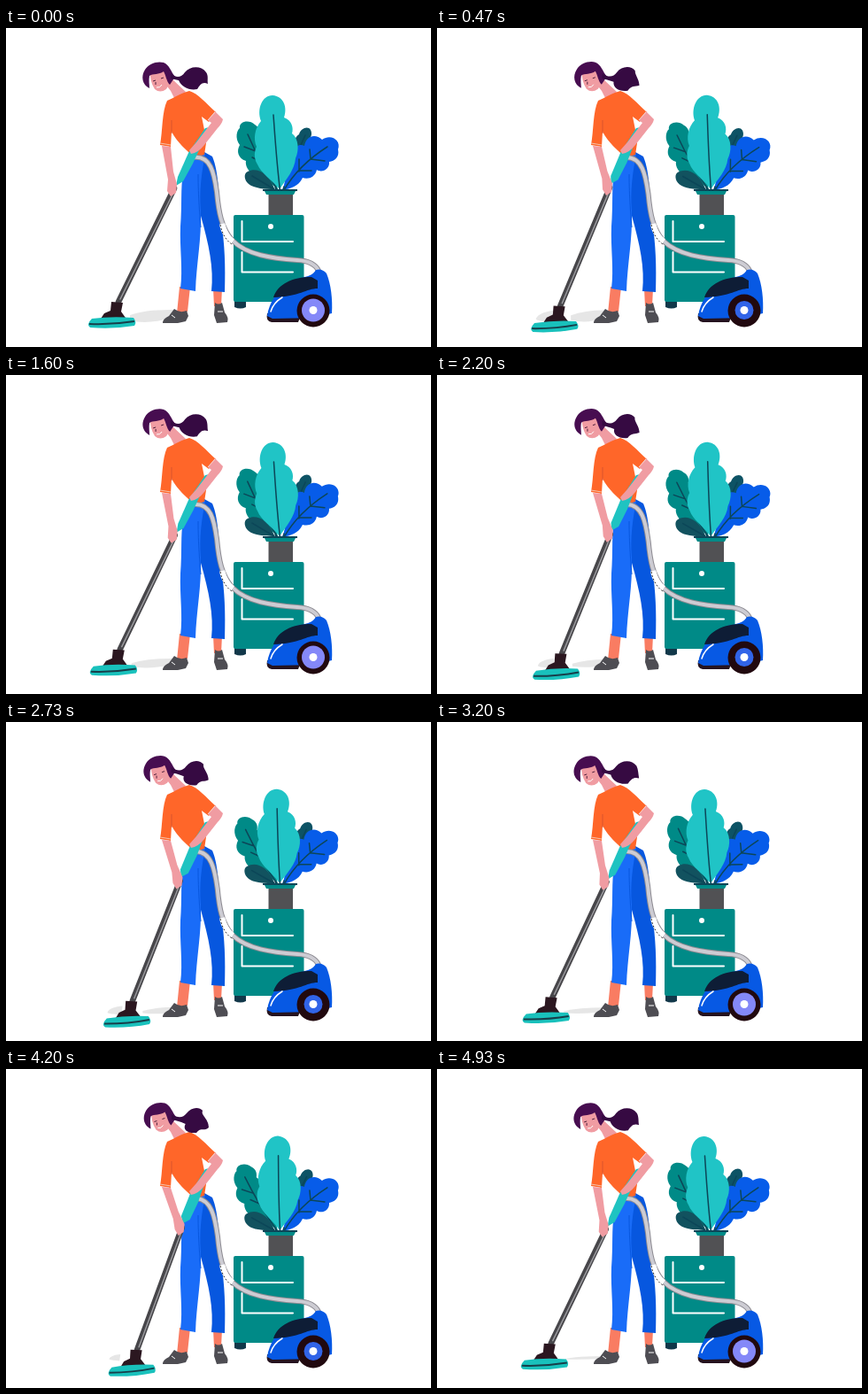
Write an HTML page that moves like this. It is 480 px wide and 360 px high and loops after 4990 ms.

```html
<!DOCTYPE html>
<html lang="en">
<head>
<meta charset="utf-8">
<title>Vacuuming</title>
<style>
html, body { margin: 0; width: 100%; height: 100%; overflow: hidden; background: #fff; }
svg { display: block; width: 100vw; height: 100vh; }
.line { fill: none; stroke-linecap: round; stroke-linejoin: round; }
.vein { fill: none; stroke: #0c4658; stroke-width: 1.5; stroke-linecap: round; }
.skin { fill: #f09ca2; }
.hair { fill: #470d50; }
.teal { fill: #008a87; }
.deep { fill: #0d5365; }
</style>
</head>
<body>
<svg viewBox="0 0 480 360">
  <g fill="#e6e6e6">
    <path id="shadowRight"/>
    <path id="shadowLeft" d="M111 329C113 322 124 319 136 318L134 333C125 331 116 332 111 329Z"/>
  </g>

  <g id="leafDark">
    <path class="deep" d="M314 180C317 164 322 151 326 140C324 130 326 123 331 120C333 113 341 110 344 115C346 119 345 123 342 126C347 132 342 139 335 142Z"/>
    <path class="vein" d="M338 121L322 156"/>
  </g>
  <g id="leafLeft">
    <path class="teal" d="M307 183C300 174 291 170 282 167C273 162 270 155 271 150C262 147 260 139 264 132C258 124 261 115 264 113C263 105 275 103 281 109C286 112 287 116 286 121C295 127 299 144 303 158Z"/>
    <path class="vein" d="M273 120C282 141 295 165 308 185M269 134L282 139M278 146L288 151"/>
  </g>
  <g id="leafLow">
    <path fill="#12525f" d="M303 182C293 182 280 181 274 176C269 172 268 164 273 162C282 157 296 162 303 181Z"/>
    <path class="vein" d="M278 167L303 182"/>
  </g>
  <g id="leafBlue">
    <path fill="#075ce9" d="M312 183C318 169 314 160 318 153C316 145 322 141 327 140C327 131 333 131 337 133C339 121 350 119 357 126C367 119 379 127 375 137C377 146 371 150 365 151C366 159 357 164 351 160C349 169 341 171 335 169C330 179 322 181 312 183Z"/>
    <path class="vein" d="M314 183C322 169 338 150 363 134M331 162L331 148M344 148L343 137M331 161L345 161M344 148L360 150"/>
  </g>
  <g id="leafMain">
    <path fill="#20c4c6" d="M309 182C300 171 288 164 284 154C279 146 281 138 283 134C279 125 281 113 288 105C283 92 289 76 301 76C314 77 318 90 314 101C323 104 325 113 323 119C331 125 331 139 327 147C326 160 317 170 309 182Z"/>
    <path class="vein" d="M302 98C304 126 306 157 310 187"/>
  </g>
  <path class="vein" d="M304 180L307 187M314 179L312 187"/>
  <path class="teal" d="M291 182H328L325 188H294Z"/>
  <path fill="#0c4658" d="M290 182H329V184H290Z"/>
  <path fill="#515154" d="M296.500 188H324V212H296.500Z"/>

  <path fill="#12384a" d="M258 308H271V315Q265 318 258 315Z"/>
  <rect class="teal" x="257" y="211" width="79.500" height="98" rx="2"/>
  <path class="line" stroke="#fff" stroke-width="2" d="M266.500 218V241H324M266.500 253V275.500H324"/>
  <circle cx="299" cy="224" r="3" fill="#fff"/>

  <path fill="#f97c62" d="M196 292H208L205 320L193 322Z M234 294H244L243 314H235Z"/>
  <path fill="#4e4d53" d="M190 317Q196 322 204 319L206 325L203 331L194 333H177Q177 328 184 325Z M236 310Q240 313 244 310L247 321Q252 327 250 332L238 333L235 324Z"/>
  <path stroke="#fff" fill="none" d="M187 324L191 327M239 320H245"/>
  <path fill="#0757df" d="M207 143L224 140L233 145C241 164 240 194 243 218C247 244 248 268 247 298L232 297C235 271 229 244 220 212L213 160Z"/>
  <path fill="#196cf8" d="M208 142L225 142C221 164 218 182 220 207C221 238 215 266 214 297L197 294C200 272 196 248 197 224C199 199 197 181 200 164Z"/>
  <path fill="none" stroke="#0757df" d="M217 165C217 190 219 214 220 225"/>

  <path class="skin" d="M179 62L188 58L203 72Q200 79 190 79L186 71Z"/>
  <path fill="#ff6629" d="M182 82C191 78 199 73 207 71C217 74 226 85 237 95L229 106L221 100L224 115L226 130L224 143L213 146C204 138 194 130 187 117L186 134L174 132C177 116 176 94 182 82Z"/>
  <path fill="none" stroke="#f6c3ab" d="M174 130L186 132"/>
  <path fill="none" stroke="#d9552f" d="M187 104V119"/>

  <path id="pole" class="line" stroke="#47464a" stroke-width="6.500"/>
  <path id="poleShine" class="line" stroke="#99999d" stroke-width="1.500"/>
  <g id="brush">
    <path fill="#2b1720" d="M119 309L132 310L130 320L135 327L107 328L111 322L118 319Z"/>
    <path fill="#19c1bc" d="M97 328Q119 325 144 327Q148 332 145 336Q121 340 95 338Q90 335 97 328Z"/>
    <path fill="none" stroke="#173e4a" stroke-width="2" d="M94 334Q120 335 145 331"/>
  </g>

  <path id="hoseEdge" class="line" stroke="#8d8b92" stroke-width="6"/>
  <path id="hose" class="line" stroke="#cdccd3" stroke-width="4"/>
  <path class="line" stroke="#fff" stroke-width="6.500" style="stroke-linecap:butt" d="M244 221C246 230 249 236 256 241"/>
  <path fill="none" stroke="#333" stroke-dasharray="2 2" d="M242 222C244 232 248 239 255 244"/>
  <path id="handle" fill="#1fc3c1"/>
  <path id="arm" class="skin"/>
  <path class="skin" d="M236 94L245 103Q244 108 239 113L224 132Q217 141 209 142L207 138L215 129L232 107L228 104Z"/>
  <path fill="none" stroke="#f9d8d0" d="M228 104L236 95"/>

  <path fill="#25131f" d="M295 322L333 324L330 332H300Q293 331 295 322Z"/>
  <path fill="#0759e4" d="M295 325C297 310 307 294 321 286C332 280 344 283 350 273Q357 271 362 277C367 289 369 306 368 322L347 327L301 328Z"/>
  <path fill="#0e1d36" d="M302 304C307 289 323 281 345 281L352 285L352 294C339 294 332 303 302 304Z"/>
  <path class="line" stroke="#fff" stroke-width="1.500" d="M299 320Q302 310 312 304"/>
  <circle cx="347" cy="319" r="18.500" fill="#21090f"/>
  <circle id="wheel" cx="347" cy="318.500"/>
  <circle cx="347" cy="318.500" r="4.500" fill="#fff"/>

  <g id="head">
    <path class="skin" d="M163 48L182 46L187 59L181 69Q174 74 168 69Q162 60 163 48Z"/>
    <path class="hair" d="M162 68C154 64 152 55 157 47C161 40 171 37 178 39C185 42 186 49 191 55L185 64C181 60 181 54 178 49C173 53 166 51 162 54C161 59 162 64 162 68Z"/>
    <path fill="none" stroke="#51213c" d="M166 60L169 59M175 57L178 56M169 61L169 64"/>
    <path fill="none" stroke="#fff" d="M170 67Q174 68 176 64"/>
  </g>
  <path id="ponytail" fill="#360a42"/>
</svg>
<script>
const LOOP = 4990, FRAME = 200 / 3, CYCLE = 25;
const el = id => document.getElementById(id);
const set = (id, name, value) => el(id).setAttribute(name, value);

// Blends two paths that share the same commands.
function blend(a, b, u) {
  const ends = b.match(/-?[\d.]+/g);
  let i = 0;
  return a.replace(/-?[\d.]+/g, n => (+n + (ends[i++] - n) * u).toFixed(2));
}

const poses = {
  pole: ["M190 181L127 309", "M199 179L149 317"],
  poleShine: ["M190 184L129 306", "M199 182L151 314"],
  handle: [
    "M225 113L230 112L211 153L200 173L192 178L194 168L206 141Z",
    "M225 113L230 112L217 151L208 170L200 174L198 166L208 141Z"
  ],
  arm: [
    "M176 133L186 134L189 162L193 176L192 186L186 190L182 184L183 171Z",
    "M176 133L186 134L195 161L202 175L201 184L195 188L191 181L189 169Z"
  ],
  hose: [
    "M212 146C231 144 235 163 238 185C240 207 243 226 256 240C272 256 300 260 329 262Q348 263 353 274",
    "M216 146C232 148 236 167 239 189C241 211 244 228 256 241C272 256 300 260 329 262Q348 263 353 274"
  ],
  ponytail: [
    "M186 51C192 57 198 56 202 50C208 43 220 42 226 50C229 54 227 59 228 63C222 60 219 64 216 69C207 71 198 66 195 59Q190 58 186 57Z",
    "M187 51C195 56 200 55 204 50C209 43 218 42 222 47C219 52 229 56 229 66C225 71 220 65 215 72C206 73 199 69 203 62Q193 58 187 57Z"
  ]
};

const turn = (id, angle, x, y) => set(id, "transform", `rotate(${angle} ${x} ${y})`);

function draw(time) {
  const frame = Math.min(74, Math.floor((time + 4) / FRAME));
  const phase = frame % CYCLE / CYCLE;
  const u = 1 - Math.abs(1 - 2 * phase);
  const near = u < 0.3;

  for (const id in poses) set(id, "d", blend(...poses[id], u));
  set("hoseEdge", "d", el("hose").getAttribute("d"));
  set("brush", "transform", `translate(${23.5 * u} ${8 * u}) rotate(${-2.5 * u} 120 332)`);
  set("head", "transform", `translate(${1.5 * u} ${-0.5 * u})`);

  turn("leafMain", 3.8 * u, 310, 185);
  turn("leafLeft", -3 * u, 308, 185);
  turn("leafDark", 1.5 * u, 314, 182);
  turn("leafLow", -2 * u, 303, 182);
  turn("leafBlue", 0.8 * Math.sin(2 * Math.PI * phase), 314, 183);
  set("wheel", "fill", near ? "#8488f8" : "#3164e8");
  set("wheel", "r", near ? 13 : 10.5);

  // The floor shadow fades away in patches over the loop.
  const start = 140 + 20 * u;
  const size = Math.max(0.15, 1 - time / 5200);
  set("shadowRight", "d", `M${start} ${328 - 4 * size}Q${start + 18} ${325 - 8 * size} 194 ${325 - 7 * size}L187 327Q${start + 20} ${327 + 8 * size} ${start} ${327 + 3 * size}Z`);
  set("shadowRight", "opacity", time > 3700 && u > 0.3 ? 0 : 1);
  set("shadowLeft", "opacity", u > 0.4 ? 1 : 0);
  set("shadowLeft", "transform", `translate(122 326) scale(${0.4 + 0.6 * size}) translate(-122 -326)`);
}

const begin = performance.now();
function tick() {
  draw((performance.now() - begin) % LOOP);
  requestAnimationFrame(tick);
}
tick();
</script>
</body>
</html>
```
